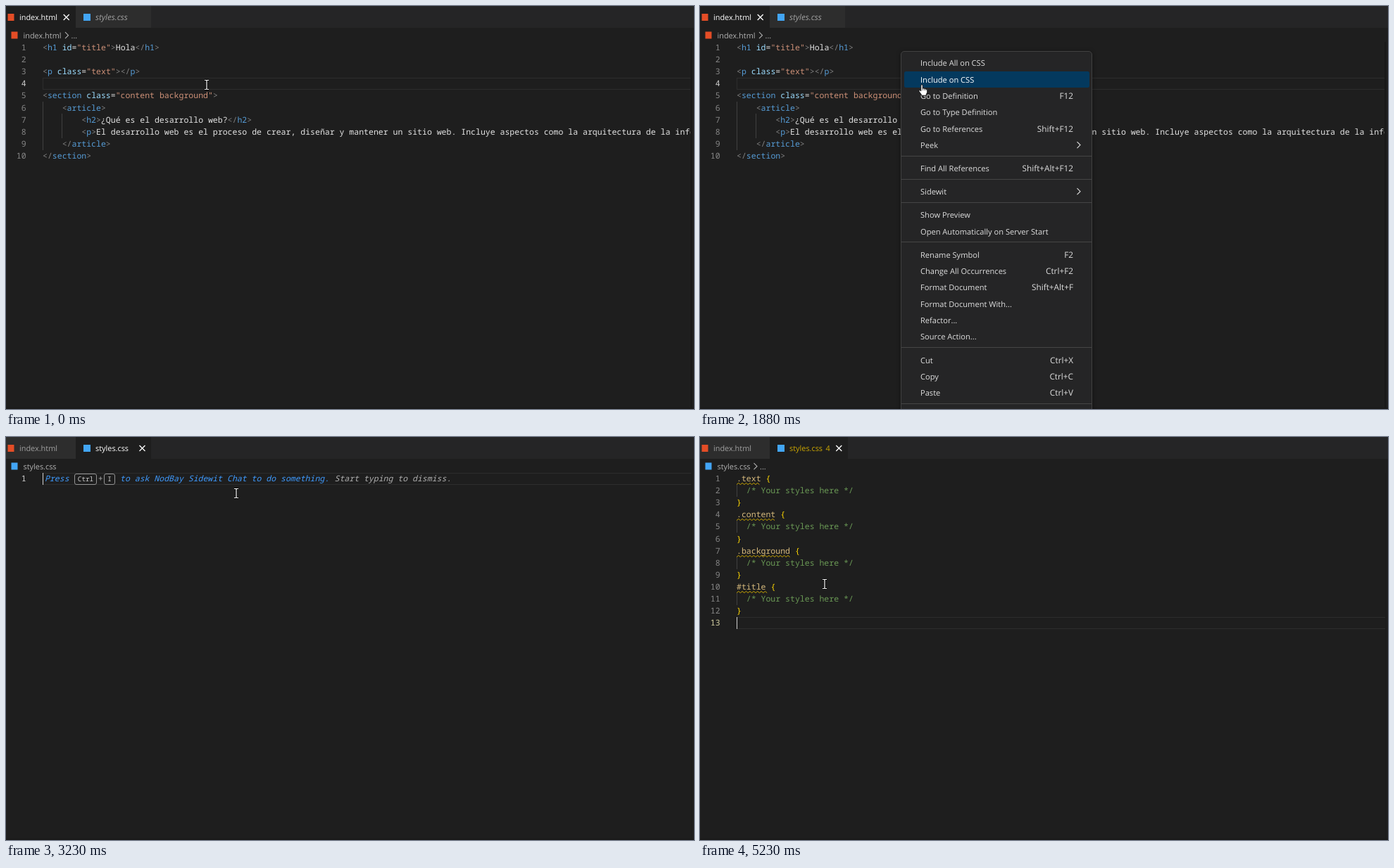
Recreate the animation shown at these times as an HTML page. Size 977 px wide and 573 px high, loop 5.43 s.

```html
<!DOCTYPE html>
<html lang="es">
<head>
<meta charset="utf-8">
<title>Editor</title>
<style>
  html, body { margin: 0; width: 100%; height: 100%; overflow: hidden; background: #1e1e1e; }
  svg { display: block; }
  text { white-space: pre; text-rendering: geometricPrecision; }
  .ui { font: 10.9px "Open Sans", "Noto Sans", sans-serif; }
  .preview { font: italic 11.6px "Open Sans", "Noto Sans", sans-serif; }
  .menu { font: 11.1px "Open Sans", "Noto Sans", sans-serif; }
  .keys { font: 11.8px "Open Sans", "Noto Sans", sans-serif; }
  .code { font: 500 11.52px "Noto Sans Mono", "DejaVu Sans Mono", monospace; }
  .cap { font: 9.3px "Noto Sans Mono", "DejaVu Sans Mono", monospace; }
  .italic { font-style: italic; }
</style>
</head>
<body>
<svg id="stage" width="977" height="573" viewBox="0 0 977 573"></svg>
<script>
const LOOP = 5430;
const LEFT = 52, PITCH = 17.08, ROW = 23.35;
const ORANGE = '#e44d26', BLUE = '#42a5f5', WARN = '#cca700';
const TEXT = '#e4e4e4', MENU_TEXT = '#dedede', HINT = '#3f9bff';
const stage = document.getElementById('stage');

function add(parent, name, attrs = {}, content) {
  const node = document.createElementNS(stage.namespaceURI, name);
  for (const key in attrs) node.setAttribute(key, attrs[key]);
  if (content !== undefined) node.textContent = content;
  parent.append(node);
  return node;
}
const group = parent => add(parent, 'g');
const box = (parent, x, y, width, height, fill, more) =>
  add(parent, 'rect', { x, y, width, height, fill, ...more });
const frame = (parent, x, y, w, h, stroke, rx = 0) =>
  box(parent, x, y, w, h, 'none', { stroke, rx });
const line = (parent, d, stroke, width = 1) =>
  add(parent, 'path', { d, stroke, 'stroke-width': width, fill: 'none' });
// Baselines sit on whole pixels to keep the text crisp
const label = (parent, x, y, str, fill, cls = 'ui', more) =>
  add(parent, 'text', { x, y: Math.round(y), fill, class: cls, ...more }, str);
const show = (node, on) => { node.style.display = on ? '' : 'none'; };

const rowTop = n => Math.round(50.9 + PITCH * (n - 1));
const baseline = n => Math.round(63.1 + PITCH * (n - 1));
const close = (parent, x) => line(parent, `M${x - 4} 12l8 8m0-8l-8 8`, '#fff', 1.3);
const chevron = (parent, x, y, color) => line(parent, `M${x} ${y - 4.5}l4.5 4.5-4.5 4.5`, color, 1.1);

function codeLine(parent, n, pieces) {
  const text = label(parent, LEFT, baseline(n), undefined, TEXT, 'code');
  for (const [str, fill] of pieces) if (str) add(text, 'tspan', { fill }, str);
}

function gutter(parent, count, active, activeColor) {
  for (let n = 1; n <= count; n++)
    label(parent, 28.7, baseline(n), n, n === active ? activeColor : '#858585', 'code', { 'text-anchor': 'end' });
  frame(parent, LEFT + .5, rowTop(active) + .5, 921, 16, '#2d2d2d');
}

function guide(parent, x, from, to) {
  box(parent, x, rowTop(from), 1, rowTop(to + 1) - rowTop(from), '#404040');
}

function colorHtml(str) {
  const parts = str.split(/(<\/?|>|(?<=<\/?)\w+|\w+(?==)|"[^"]*")/);
  return parts.map((part, i) => {
    if (i % 2 === 0) return [part, TEXT];
    if (/^[<>]/.test(part)) return [part, '#808080'];
    if (part[0] === '"') return [part, '#ce9178'];
    return [part, /^</.test(parts[i - 2] || '') ? '#569cd6' : '#9cdcfe'];
  });
}

function tabs(parent, active, widthCss) {
  const html = active === 'html';
  box(parent, 0, 0, 977, 31, '#252526');
  box(parent, 0, 0, 99, 31, html ? '#1e1e1e' : '#2d2d2d');
  box(parent, 99, 0, widthCss, 31, html ? '#2d2d2d' : '#1e1e1e');
  box(parent, 2.5, 11, 9, 10, ORANGE);
  box(parent, 110, 11, 10, 10, BLUE);
  label(parent, 19, 20, 'index.html', html ? '#fff' : '#a0a0a0');
}

function crumbs(parent, name, color) {
  box(parent, 7.5, 36.5, 9, 10, color);
  label(parent, 24.5, 46, name, '#b2b2b2');
}

// index.html
const htmlView = group(stage);
tabs(htmlView, 'html', 107);
close(htmlView, 85.7);
label(htmlView, 127, 20, 'styles.css', '#a0a0a0', 'preview');
crumbs(htmlView, 'index.html', ORANGE);
chevron(htmlView, 84, 41.7, '#b2b2b2');
label(htmlView, 92.5, 46, '...', '#b2b2b2');
gutter(htmlView, 10, 4, '#d0d0d0');
guide(htmlView, 52, 6, 9);
guide(htmlView, 79, 7, 8);
[
  '<h1 id="title">Hola</h1>',
  '',
  '<p class="text"></p>',
  '',
  '<section class="content background">',
  '    <article>',
  '        <h2>¿Qué es el desarrollo web?</h2>',
  '        <p>El desarrollo web es el proceso de crear, diseñar y mantener un sitio web. Incluye aspectos como la arquitectura de la información',
  '    </article>',
  '</section>'
].forEach((str, i) => codeLine(htmlView, i + 1, colorHtml(str)));
box(htmlView, 973, 51, 4, 522, '#1e1e1e');
box(htmlView, 972, 51, 2, 522, '#181818');

// styles.css: shared frame, empty page with hint, generated rules
const cssView = group(stage);
const cssTabs = group(cssView), cssTabsWarn = group(cssView);
tabs(cssTabs, 'css', 107);
close(cssTabs, 193.5);
label(cssTabs, 127, 20, 'styles.css', '#fff');
tabs(cssTabsWarn, 'css', 111);
close(cssTabsWarn, 197.3);
label(cssTabsWarn, 127, 20, 'styles.css', WARN);
label(cssTabsWarn, 178.5, 20, '4', WARN);
crumbs(cssView, 'styles.css', BLUE);
const cssMore = group(cssView);
chevron(cssMore, 76.5, 41.7, '#b2b2b2');
label(cssMore, 85, 46, '...', '#b2b2b2');

const emptyPage = group(cssView);
gutter(emptyPage, 1, 1, '#d0d0d0');
const hint = group(emptyPage);
label(hint, 55, 63, 'Press', HINT, 'code italic');
frame(hint, 97.5, 52.5, 31, 15, '#949494', 2.5);
label(hint, 113, 63, 'Ctrl', '#d0d0d0', 'cap', { 'text-anchor': 'middle' });
label(hint, 130.8, 63, '+', '#b0b0b0', 'code');
frame(hint, 139.5, 52.5, 15, 15, '#949494', 2.5);
label(hint, 147, 63, 'I', '#d0d0d0', 'cap', { 'text-anchor': 'middle' });
label(hint, 162, 63, 'to ask NodBay Sidewit Chat to do something.', HINT, 'code italic');
label(hint, 466.5, 63, 'Start typing to dismiss.', '#b0b0b0', 'code italic');

const rules = group(cssView), squiggles = group(cssView);
gutter(rules, 13, 13, '#d2cda0');
['.text', '.content', '.background', '#title'].forEach((name, i) => {
  const n = 1 + i * 3;
  guide(rules, 52, n + 1, n + 1);
  codeLine(rules, n, [[name, '#d7ba7d'], [' {', '#ffd700']]);
  codeLine(rules, n + 1, [['  /* Your styles here */', '#6a9955']]);
  codeLine(rules, n + 2, [['}', '#ffd700']]);
  const waves = Math.round(name.length * 6.912 / 5.4);
  line(squiggles, `M${LEFT} ${baseline(n) + 4.6}` + 'l2.7-2.2 2.7 2.2'.repeat(waves), WARN);
});
box(cssView, 973, 51, 1, 522, '#1b1b1b');
box(stage, 0, 571, 977, 2, '#191919');

const caret = box(stage, LEFT, 0, 1, 17, '#d0d0d0');

// Context menu: null marks a separator, '>' a submenu
const menu = group(stage);
const shadow = box(menu, 285.5, 64.5, 271, 520, '#252526', { rx: 4.5, stroke: '#414141' });
shadow.style.filter = 'drop-shadow(0 1px 3px rgba(0,0,0,.4))';
const selection = box(menu, 290, 0, 263, 23, '#04395e', { rx: 2.5 });
const menuLabels = [];
let menuY = 81.4;
for (const item of [
  ['Include All on CSS'], ['Include on CSS'], ['Go to Definition', 'F12'],
  ['Go to Type Definition'], ['Go to References', 'Shift+F12'], ['Peek', '>'], null,
  ['Find All References', 'Shift+Alt+F12'], null,
  ['Sidewit', '>'], null,
  ['Show Preview'], ['Open Automatically on Server Start'], null,
  ['Rename Symbol', 'F2'], ['Change All Occurrences', 'Ctrl+F2'],
  ['Format Document', 'Shift+Alt+F'], ['Format Document With...'], ['Refactor...'], ['Source Action...'], null,
  ['Cut', 'Ctrl+X'], ['Copy', 'Ctrl+C'], ['Paste', 'Ctrl+V'], null
]) {
  if (!item) {
    box(menu, 286, Math.round(menuY - 8.6), 270, 1, '#454545');
    menuY += 9.7;
    continue;
  }
  const [name, keys] = item;
  menuLabels.push(label(menu, 313, menuY + 4, name, MENU_TEXT, 'menu'));
  if (keys === '>') chevron(menu, 535.5, menuY - .6, MENU_TEXT);
  else if (keys) label(menu, 530, menuY + 4, keys, MENU_TEXT, 'keys', { 'text-anchor': 'end' });
  menuY += ROW;
}

// Pointers, each drawn around its hot spot
const pointers = { beam: group(stage), arrow: group(stage), hand: group(stage) };
const beam = 'M-3-6.5h2.2l.8.8.8-.8h2.2M-3 6.5h2.2l.8-.8.8.8h2.2M0-6v12';
line(pointers.beam, beam, '#000', 2.8);
line(pointers.beam, beam, '#fff', 1.2);
const outlined = { fill: '#fff', stroke: '#000', 'stroke-width': .8, 'stroke-linejoin': 'round' };
add(pointers.arrow, 'path', { d: 'M0 0v14.5l3.4-3.2 2.2 5 2.2-1-2.2-4.8h4.7z', ...outlined });
add(pointers.hand, 'path', {
  d: 'M-1.2 9V1q0-1.3 1.2-1.3T1.2 1v4.2q1.6-.8 2.3.5 1.6-.6 2.2.6 2-.4 2 1.4v3.1l-1.4 2.8v1.6H-.6v-1.2L-4 9.2Q-4.6 7.6-3 7.5z',
  ...outlined
});
line(pointers.hand, 'M1.2 5v3m2.4-2.2v2.4m2.2-1.8v2', '#000', .6);

// Each step changes only what it names
const steps = [
  [0, { view: 'html', page: '', menu: false, row: -1, line: 4, caret: false, more: false, warn: false, pointer: 'beam', x: 285, y: 112 }],
  [70, { caret: true }],
  [590, { caret: false }],
  [1050, { caret: true }],
  [1250, { caret: false }],
  [1340, { menu: true, pointer: 'arrow' }],
  [1600, { pointer: 'hand', row: 1, x: 288, y: 113 }],
  [1670, { x: 289, y: 115 }],
  [1740, { row: 2, x: 294, y: 118 }],
  [1810, { x: 305, y: 117 }],
  [1880, { row: 1, x: 315, y: 112 }],
  [1950, { x: 320, y: 108 }],
  [2280, { x: 321, y: 102 }],
  [2350, { row: 0, x: 324, y: 91 }],
  [2420, { x: 326, y: 84 }],
  [2490, { x: 327.5, y: 80 }],
  [3020, { menu: false, pointer: 'beam', x: 327 }],
  [3160, { view: 'css', page: 'empty', line: 1, caret: true }],
  [3230, { page: 'hint' }],
  [3300, { page: 'rules', line: 13 }],
  [3360, { warn: true }],
  [3620, { more: true }],
  [3750, { caret: false }],
  [3950, { x: 318, y: 89 }],
  [4020, { x: 285, y: 120 }],
  [4090, { x: 232, y: 168 }],
  [4160, { x: 190, y: 200 }],
  [4240, { x: 177, y: 209, caret: true }],
  [4770, { caret: false }],
  [5230, { caret: true }]
];

function draw(time) {
  const s = Object.assign({}, ...steps.filter(([at]) => at <= time).map(([, change]) => change));
  show(htmlView, s.view === 'html');
  show(cssView, s.view === 'css');
  show(cssTabs, !s.warn);
  show(cssTabsWarn, s.warn);
  show(cssMore, s.more);
  show(emptyPage, s.page !== 'rules');
  show(hint, s.page === 'hint');
  show(rules, s.page === 'rules');
  show(squiggles, s.warn);
  show(caret, s.caret);
  caret.setAttribute('y', rowTop(s.line));
  show(menu, s.menu);
  show(selection, s.row >= 0);
  selection.setAttribute('y', Math.round(69.6 + ROW * Math.max(0, s.row)));
  menuLabels.forEach((node, i) => node.setAttribute('fill', i === s.row ? '#fff' : MENU_TEXT));
  for (const name in pointers) show(pointers[name], name === s.pointer);
  pointers[s.pointer].setAttribute('transform', `translate(${s.x} ${s.y})`);
}

const start = performance.now();
function tick() {
  draw((performance.now() - start) % LOOP);
  requestAnimationFrame(tick);
}
tick();
</script>
</body>
</html>
```
